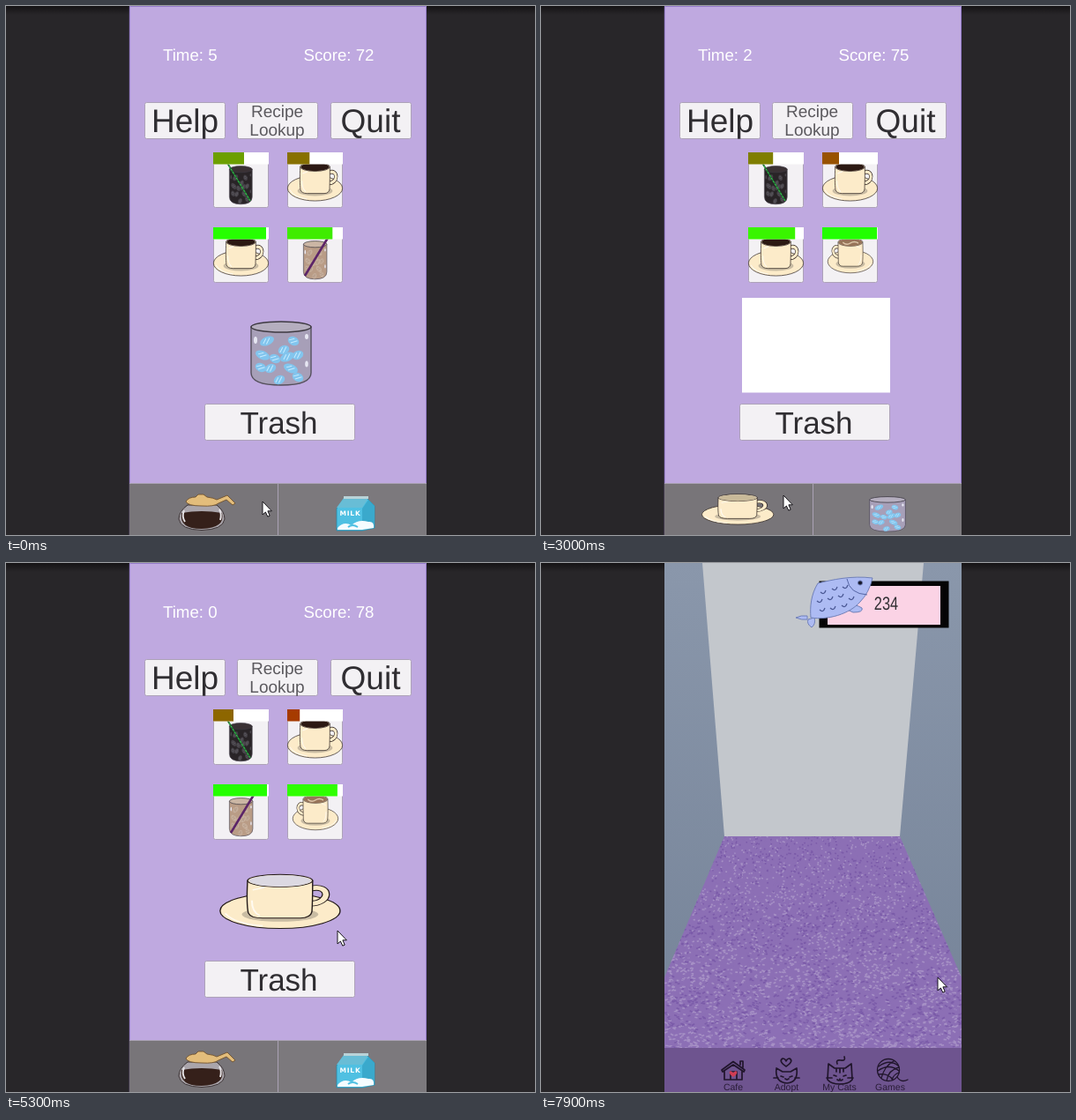
An HTML page that plays this animation: 600x600 px, repeating every 8000 ms.

```html
<!DOCTYPE html>
<html lang="en">
<head>
<meta charset="utf-8">
<title>Cafe game</title>
<style>
html, body { margin: 0; width: 100%; height: 100%; overflow: hidden; background: #282629; }
svg { display: block; width: 100vw; height: 100vh; }
text { font-family: "Liberation Sans", Arial, sans-serif; fill: #302e32; text-rendering: geometricPrecision; }
.mid { text-anchor: middle; }
.btn { fill: #f3f1f4; stroke: #ada2b8; stroke-width: 1; }
.hud { fill: #fff; font-size: 18.7px; }
.msg { fill: #4b3d57; font-size: 17.25px; }
.ink { fill: none; stroke: #20152b; stroke-width: 1.7; stroke-linecap: round; stroke-linejoin: round; }
.tab { fill: #2a1d38; font-size: 10.5px; }
.carton { fill: #fff; font: bold 7.5px "DejaVu Sans", sans-serif; letter-spacing: .8px; }
</style>
</head>
<body>
<svg id="stage" viewBox="0 0 600 600"></svg>
<script>
const stage = document.getElementById('stage');
const LOOP = 8000, STEP = 100;

const rect = (x, y, w, h, attrs) => `<rect x="${x}" y="${y}" width="${w}" height="${h}" ${attrs}/>`;
const path = (d, attrs) => `<path d="${d}" ${attrs}/>`;
const oval = (x, y, rx, ry, attrs) => `<ellipse cx="${x}" cy="${y}" rx="${rx}" ry="${ry}" ${attrs}/>`;
const text = (s, x, y, size, cls = 'mid', extra = '') =>
  `<text x="${x}" y="${y}" class="${cls}" ${size ? `font-size="${size}"` : ''} ${extra}>${s}</text>`;
const use = (id, x, y, sx = 1, sy = sx, extra = '') =>
  `<use href="#${id}" transform="translate(${x} ${y}) scale(${sx} ${sy})" ${extra}/>`;
const button = (x, y, w, h, extra = '') => rect(x + .5, y + .5, w - 1, h - 1, `rx="2" class="btn" ${extra}`);

// Deterministic random numbers
function seeded(seed) {
  return () => (seed = (seed * 16807) % 2147483647) / 2147483647;
}

// Cup on a saucer, 168 x 107
function cup(id, fill, swirl = '') {
  const handle = 'M127 29C154 21 155 58 125 58', line = 'stroke="#231a18" stroke-width="1.7"';
  return `<g id="${id}">` +
    oval(84, 72, 83, 34, `fill="#fcebc9" ${line}`) +
    oval(84, 79, 53, 14, 'fill="#a99d8b" opacity=".6"') +
    path('M8 77Q20 96 60 101', 'fill="none" stroke="#fffaf0" stroke-width="2.5"') +
    path(handle, 'fill="none" stroke="#231a18" stroke-width="11"') +
    path(handle, 'fill="none" stroke="#fcebc9" stroke-width="8"') +
    path('M39 14C38 40 38 64 40 76Q43 86 60 86H112Q126 86 128 74C129 55 129 35 129 14Z',
      `fill="#fcebc9" ${line}`) +
    path('M45 52Q45 75 56 81M46 32L62 27', 'fill="none" stroke="#fffaf0" stroke-width="2.5"') +
    oval(84, 14, 45, 12, `fill="#e9dcc8" ${line}`) +
    oval(84, 14.5, 42.5, 11, `fill="${fill}"`) + swirl + '</g>';
}

// Tumbler with ice, 70 x 74
const cubes = [[19, 23], [49, 23], [38, 33], [14, 39], [54, 39], [28, 43], [42, 41],
  [12, 53], [23, 54], [46, 54], [33, 67], [54, 64]];
function glass(id, fill, rim, ice, edge, shine = '#e6e6f2') {
  const blobs = cubes.map(([x, y], i) =>
    `<g transform="translate(${x} ${y}) rotate(${i % 2 ? 24 : -24})">` +
    oval(0, 0, i % 3 ? 6.5 : 8.5, 4.8, `fill="${ice}"`) +
    path('M-5 1L0-3M-2 3L4-2', `stroke="${edge}" stroke-width="1"`) + '</g>').join('');
  return `<g id="${id}">` +
    path('M1 7V59Q1 73 35 73Q69 73 69 59V7Z', `fill="${fill}" stroke="#55505c" stroke-width="1.4"`) +
    blobs +
    oval(6, 22, 2, 4, `fill="${shine}"`) + oval(64, 18, 2, 3, `fill="${shine}"`) +
    oval(64, 49, 1.8, 3.5, `fill="${shine}"`) +
    oval(35, 7, 34, 6, `fill="${rim}" stroke="#3e3a42" stroke-width="1.4"`) + '</g>';
}

const pot = '<g id="pot">' +
  path('M10 12Q0 19 0 28Q2 40 26 40.5Q50 40 52 28Q52 19 43 12Z', 'fill="#aaa5ab" stroke="#3c3335" stroke-width="1"') +
  path('M3 21Q26 17 49 21Q53 38 26 39Q0 39 3 21Z', 'fill="#35201a"') +
  path('M6 18Q3 25 7 31M46 17Q49 22 47 29', 'fill="none" stroke="#e6e3e6" stroke-width="2"') +
  path('M8 8Q11 3 19 3L22 0H28L32 3Q40 4 43 6L55 1L64 10L61 12L54 6L45 10Q40 14 26 13Q10 13 8 8Z',
    'fill="#e3bd7b" stroke="#70522e" stroke-width=".9"') + '</g>';

const carton = '<g id="milk">' +
  path('M1 14L9 3H36L44 11V36L30 39H1Z', 'fill="#4fc0e2" stroke="#2789aa" stroke-width=".8"') +
  path('M30 14L37 4L44 11V36L30 39Z', 'fill="#3aa9cc"') +
  path('M9 2H37L30 13H1Z', 'fill="#68bdd6"') +
  path('M9 0H37V3H9Z', 'fill="#b9d3d8"') +
  path('M2 36Q9 28 18 33Q25 26 37 29Q44 28 43 36L30 38H2Z', 'fill="#f5fcff"') +
  path('M14 35Q19 31 25 35', 'fill="none" stroke="#4fc0e2" stroke-width="2"') +
  text('MILK', 16.5, 21.5, 0, 'mid carton') + '</g>';

const darkDrink = '<g id="darkDrink">' + use('colaGlass', 18, 15, .38, .6) +
  path('M16 12L42 55', 'stroke="#1d6b2e" stroke-width="1.8"') +
  path('M16 12L42 55', 'stroke="#3fd456" stroke-width="1" stroke-dasharray="2 2"') + '</g>';
const tanDrink = '<g id="tanDrink">' + use('latte', 18, 15, .39, .6) +
  path('M46 12L20 55', 'stroke="#5c2468" stroke-width="2.6"') + '</g>';

const swirl = path('M55 17Q70 9 84 17T112 15', 'fill="none" stroke="#dcc5aa" stroke-width="4"');
const defs = '<defs>' +
  '<linearGradient id="shade" x2="0" y2="1"><stop stop-color="#151315"/><stop offset="1" stop-color="#282629"/></linearGradient>' +
  '<linearGradient id="wall" x2="0" y2="1"><stop stop-color="#8a97ab"/><stop offset="1" stop-color="#738196"/></linearGradient>' +
  '<clipPath id="floorClip"><path d="M208 310H407L477 470V550H140V470Z"/></clipPath>' +
  cup('cup', '#dcd9e2') + cup('coffee', '#2c1913') + cup('latteCup', '#977459', swirl) +
  cup('cupPick', '#c8b999') +
  glass('ice', '#a79fb8', '#b5aebf', '#82c5ee', '#c6ebff') +
  glass('whiteGlass', '#d3d3d8', '#fafafc', '#c3d3e4', '#e3eaf2', '#f4f4f8') +
  glass('latte', '#b99c86', '#cbb6a4', '#c7b09d', '#a58b78') +
  glass('colaGlass', '#292427', '#3a3134', '#454147', '#67656b', '#4b474e') +
  pot + carton + darkDrink + tanDrink + '</defs>';

// Order cards
const cards = [[235, 166], [319, 166], [235, 251], [319, 251]];
const coffeeIcon = (x, y) => use('coffee', x, y + 10.5, .375, .42);
const latteIcon = (x, y) => use('latteCup', x + 58, y + 11.5, -.31, .38);
function card([x, y], i) {
  const icons = [
    use('darkDrink', x, y),
    coffeeIcon(x, y),
    `<g id="o3a">${coffeeIcon(x, y)}</g><g id="o3b">${use('tanDrink', x, y)}</g>`,
    `<g id="o4a">${use('tanDrink', x, y)}</g><g id="o4b">${latteIcon(x, y)}</g>`
  ];
  return button(x, y, 63, 63) + icons[i] + rect(x, y, 63, 13.5, 'fill="#fff"') +
    rect(x, y, 0, 13.5, `id="bar${i}"`);
}

const panel = fill => rect(140, 0, 337, 600, `fill="${fill}"`) +
  path('M140.3 600V.5H476.5V600', 'fill="none" stroke="#957cca" stroke-width="1"');

const game = '<g id="game">' + panel('#bfa9e0') +
  text('', 178, 62, 0, 'hud', 'id="time"') + text('', 337.5, 62, 0, 'hud', 'id="score"') +
  button(157, 109, 92, 42) + button(262, 109, 92, 42) + button(368, 109, 92, 42) +
  text('Help', 203, 142.7, 37) + text('Quit', 413.5, 142.7, 37) +
  text('Recipe', 307.5, 126, 19, 'mid', 'style="fill:#5b595e"') +
  text('Lookup', 307.5, 147, 19, 'mid', 'style="fill:#5b595e"') +
  cards.map(card).join('') +
  `<g id="m-ice">${use('ice', 277, 357)}</g><g id="m-white">${use('whiteGlass', 277, 357)}</g>` +
  `<g id="m-latte">${use('latte', 277, 357)}</g><g id="m-coffee">${use('coffee', 228, 332)}</g>` +
  `<g id="m-cup">${use('cup', 242, 352, .82, .59)}</g>` +
  `<g id="m-blank">${rect(228, 331, 168, 107.5, 'fill="#fff"')}</g>` +
  button(225, 451, 171, 42) + text('Trash', 309.5, 484.7, 35) +
  rect(140, 541, 337, 59, 'fill="#aaa2b4"') +
  rect(140, 542, 168, 58, 'fill="#787579"') + rect(309, 542, 168, 58, 'fill="#7c797d"') +
  `<g id="pickBase">${use('cupPick', 182, 553, .49, .33)}${use('ice', 372, 556, .6, .55)}</g>` +
  `<g id="pickMix">${use('pot', 196, 554)}${use('milk', 374, 556)}</g></g>`;

const lines = [['You servered 78 customers, missed 0,', 128], ['giving you a score of 78', 148],
  ['You earned a new high score!!!', 187], ['Highscore: 234', 226], ['You earned 234 fish', 265]];
const result = '<g id="result">' + panel('#c09ada') +
  lines.map(([s, y]) => text(s, 308.5, y, 0, 'mid msg')).join('') +
  button(201, 299, 215, 63, 'id="back"') + text('Back To Cafe', 308.3, 343, 35.4) + '</g>';

function carpet() {
  const rnd = seeded(41), tones = ['', '', ''];
  for (let i = 0; i < 6500; i++) {
    const u = rnd(), y = 308 + 244 * u, x = 140 + 337 * rnd(), s = .6 + u * .8;
    const patch = Math.sin(x / 17 + 2 * Math.sin(y / 13)) * .1 + Math.sin(y / 14) * .12;
    const k = rnd() + patch + u * .12;
    const a = rnd() * 3 - 1.5;
    tones[k > .64 ? 0 : k > .34 ? 1 : 2] +=
      `M${x.toFixed(1)} ${y.toFixed(1)}l${(2.4 * s).toFixed(1)} ${(a * s).toFixed(1)}`;
  }
  const colors = ['#b19fcc', '#8c70b5', '#7453a4'];
  return '<g clip-path="url(#floorClip)">' + rect(140, 308, 337, 244, 'fill="#8c6fb5"') +
    tones.map((d, i) => path(d, `stroke="${colors[i]}" stroke-width="1.6" opacity=".7"`)).join('') + '</g>';
}

const scales = [[320, 33], [333, 29], [345, 27], [316, 43], [328, 40], [340, 37], [352, 40], [319, 53], [331, 51], [344, 48]];
const fish = '<g stroke="#7080b8" stroke-width="1" fill="#adbbf3">' +
  path('M302 60Q295 59 289 62Q296 65 302 64ZM303 64Q301 69 307 73Q312 69 310 62Z', '') +
  path('M343 51Q356 45 364 51Q366 56 354 56Z', '') +
  path('M376 17C352 14 330 19 314 23C306 36 305 50 306 62C325 65 350 58 362 44Q372 34 376 17Z', '') +
  path('M347 18Q350 35 370 36', 'fill="none" stroke="#5565a4"') +
  path(scales.map(([x, y]) => `M${x - 3} ${y}q4 4 6-2`).join(''), 'fill="none" stroke="#4b5995" stroke-width="1.3"') +
  '<circle cx="362" cy="22.5" r="2.6" fill="#17192b"/></g>';

const tabs = '<g class="ink">' +
  path('M205 575L218 565.5L231 575L230 577L218 569L206 577ZM208 576V586H228V576M226 569V565H229V572M215 585V577H222V585', '') +
  path('M218 583Q211 578 215 576L218 578L221 576Q225 578 218 583Z', 'fill="#cf3d53" stroke="none"') +
  path('M278 571Q269 565 274 562Q277 562 278 565Q279 562 282 562Q287 565 278 571Z', '') +
  path('M267 573L274 577H283L290 573Q292 589 279 590Q265 589 267 573M272 582L275 583M282 583L285 582M277 585L279 586L281 585M264 584H269M288 584H293', '') +
  path('M326 568L333 573H345L352 568L353 586Q349 591 339 591Q329 591 325 586ZM336 568Q334 563 340 564Q346 565 344 560M339 574V578M335 574V577M343 574V577M332 581L335 582M343 582L346 581M336 586Q339 588 339 585Q339 588 342 586M324 584H330M348 584H354', '') +
  '<g stroke-width="1.3"><circle cx="394" cy="575" r="12.5"/>' +
  path('M383 571Q395 562 405 570M382 576Q395 567 406 576M386 584Q390 570 400 565M392 587Q394 575 406 572M398 586Q400 580 406 578M383 580Q393 578 399 586M404 583Q408 590 416 586', '') + '</g></g>' +
  [['Cafe', 218], ['Adopt', 278.5], ['My Cats', 338.5], ['Games', 396]]
    .map(([s, x]) => text(s, x, 598, 0, 'mid tab')).join('');

const cafe = '<g id="cafe">' + rect(140, 0, 337, 600, 'fill="url(#wall)"') +
  path('M183 0H434L407 310H208Z', 'fill="#c3c7cc"') + carpet() +
  rect(315.5, 20.5, 147, 53, 'fill="#050405"') + rect(325, 26, 128, 44, 'fill="#fbd3e5"') + fish +
  `<g transform="translate(391.5 52.5) scale(.78 1)">${text('234', 0, 0, 21)}</g>` +
  rect(140, 550, 337, 50, 'fill="#6e548f"') + tabs + '</g>';

stage.innerHTML = defs + rect(0, 0, 600, 600, 'fill="#282629"') +
  rect(0, 0, 600, 10, 'fill="url(#shade)"') + game + result + cafe +
  path('M0 0V15L3.4 12L5.8 17.2L8.2 16.1L5.9 10.8H10.4Z',
    'id="cursor" fill="#fff" stroke="#17151a" stroke-width="1" stroke-linejoin="round"');

const $ = id => document.getElementById(id);
const show = (id, on) => { $(id).style.display = on ? '' : 'none'; };

const mixes = [[0, 'ice'], [800, 'white'], [1500, 'latte'], [2600, 'blank'], [3100, 'cup'],
  [3500, 'coffee'], [4400, 'blank'], [4900, 'cup']];
const mixNames = [...new Set(mixes.map(m => m[1]))];
const SERVE_A = 2600, SERVE_B = 4400, END = 5400, HOME = 7000;

const moves = [[0, 291, 562], [500, 330, 566], [800, 330, 566], [1200, 283, 557], [1500, 280, 557],
  [2300, 345, 290], [2600, 345, 290], [3000, 275, 555], [3500, 270, 562], [4000, 244, 311],
  [4400, 246, 306], [4800, 268, 560], [4900, 270, 560], [5300, 376, 417], [5400, 370, 341],
  [6400, 347, 318], [6900, 347, 318], [7500, 514, 470], [7800, 505, 525], [7900, 450, 470]];

function pointer(t) {
  const i = moves.findIndex(m => m[0] > t);
  if (i < 0) return moves[moves.length - 1].slice(1);
  const [t0, x0, y0] = moves[i - 1], [t1, x1, y1] = moves[i];
  const p = (t - t0) / (t1 - t0), e = p * p * (3 - 2 * p);
  return [x0 + (x1 - x0) * e, y0 + (y1 - y0) * e];
}

function setBar(i, width) {
  const f = width / 63, bar = $('bar' + i);
  bar.setAttribute('width', width.toFixed(1));
  bar.setAttribute('fill', `rgb(${Math.round(205 - 175 * f)},${Math.round(Math.min(255, 300 * f - 8))},0)`);
}

function draw(t) {
  const playing = t < END;
  show('game', playing);
  show('result', !playing && t < HOME);
  show('cafe', t >= HOME);
  if (playing) {
    const s = t / 1000, a = t >= SERVE_A, b = t >= SERVE_B;
    const mix = mixes.filter(m => m[0] <= t).pop()[1];
    mixNames.forEach(n => show('m-' + n, n === mix));
    show('pickBase', mix === 'blank');
    show('pickMix', mix !== 'blank');
    show('o3a', !b); show('o3b', b);
    show('o4a', !a); show('o4b', a);
    $('time').textContent = 'Time: ' + (5 - Math.floor((t + 100) / 1000));
    $('score').textContent = 'Score: ' + (b ? 78 : a ? 75 : 72);
    setBar(0, 35 - 2.26 * s);
    setBar(1, 25.3 - 2.1 * s);
    setBar(2, b ? 63 - 2.26 * (t - SERVE_B) / 1000 : 60 - 2.26 * s);
    setBar(3, a ? 63 - 2.26 * (t - SERVE_A) / 1000 : 51.3 - 2.26 * s);
  }
  $('back').style.fill = t >= 6800 ? '#cbc8cc' : t >= 5600 ? '#ebe9ec' : '#f3f1f4';
  const [x, y] = pointer(t);
  $('cursor').setAttribute('transform', `translate(${x.toFixed(1)} ${y.toFixed(1)})`);
}

const start = performance.now();
function tick(now) {
  const t = Math.max(0, now - start) % LOOP;
  draw(Math.floor(t / STEP) * STEP);
  requestAnimationFrame(tick);
}
draw(0);
requestAnimationFrame(tick);
</script>
</body>
</html>
```
